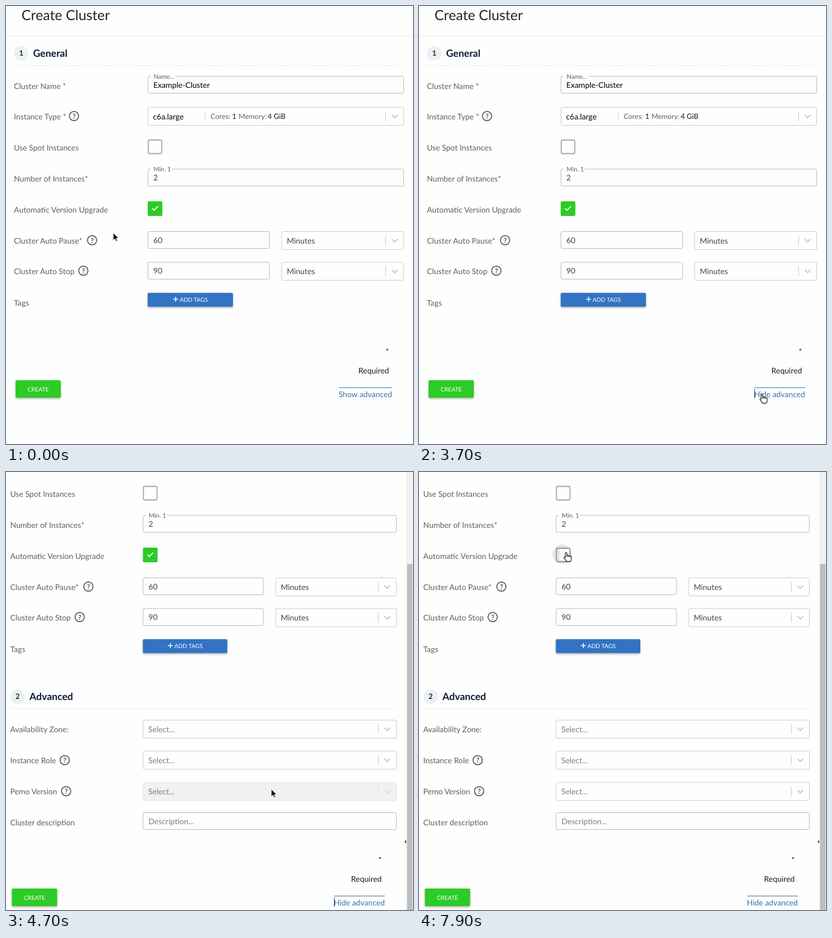
These frames come from a looping animation (721 px wide and 776 px high, 8000 ms). An HTML page:

```html
<!DOCTYPE html>
<html lang="en">
<head>
<meta charset="utf-8">
<title>Create Cluster</title>
<style>
  html, body { margin: 0; width: 100%; height: 100%; overflow: hidden; background: #fefefe; }
  svg { display: block; width: 721px; height: 776px; font: 13.85px Lato, sans-serif; text-rendering: geometricPrecision; }
  text { white-space: pre; fill: #1c1c1c; }
  .label { fill: #606060; }
  .title { font-size: 24.8px; fill: #212529; }
  .head { font-size: 17.5px; font-weight: 700; fill: #0d1a35; }
  .num { font-size: 13px; font-weight: 700; fill: #1c2937; text-anchor: middle; }
  .legend { font-size: 11px; fill: #606060; }
  .black { fill: #000; }
  .value { fill: #444; }
  .hint { fill: #7c7c7c; }
  .small { font-size: 13px; }
  .spec { font-size: 12.5px; fill: #606060; }
  .caps { font-size: 10.3px; fill: #fff; }
  .link { fill: #3873b0; }
  .mid { text-anchor: middle; }
  .end { text-anchor: end; }
  .input { fill: #fefefe; stroke: #b9b9b9; }
  .select { fill: #fefefe; stroke: #cacaca; }
  .off { fill: #f1f1f1; stroke: #e5e5e5; }
  .btn { filter: drop-shadow(0 2px 1.5px rgba(0, 0, 0, .2)) drop-shadow(0 1px 2px rgba(0, 0, 0, .14)); }
</style>
</head>
<body>
<svg id="stage" viewBox="0 0 721 776"></svg>
<script>
const LOOP = 8000, STEP = 100;
const OPENED = 3700, EXPANDED = 3800, UNCHECKED = 7100, BLINK = 482;
const ADVANCED_SHIFT = 287;

const text = (x, y, s, cls = '') => `<text x="${x}" y="${y}" class="${cls}">${s}</text>`;
const rect = (x, y, w, h, cls, fill = '') =>
  `<rect x="${x}" y="${y}" width="${w}" height="${h}" rx="2" class="${cls}" ${fill && `fill="${fill}"`}/>`;
const path = (d, stroke, width = 1, extra = '') =>
  `<path d="${d}" fill="none" stroke="${stroke}" stroke-width="${width}" ${extra}/>`;

const help = (x, y) =>
  `<circle cx="${x}" cy="${y}" r="8.2" fill="none" stroke="#555" stroke-width="1.7"/>` +
  `<text x="${x}" y="${y + 4.5}" class="mid" style="font-size:12.5px;font-weight:700;fill:#555">?</text>`;

const input = (x, y, w, s, cls) =>
  rect(x, y, w, 30, 'input') + text(x + 9.5, y + 20, s, cls);

const legend = (x, y, w, s) =>
  `<rect x="${x + 5}" y="${y - 2}" width="${w}" height="4" fill="#fefefe"/>` +
  text(x + 10, y + 4, s, 'legend');

function select(x, y, w, s, cls = 'value', box = 'select') {
  const r = x + w, c = y + 16, tone = box === 'off' ? '#dcdcdc' : '#c8c8c8';
  return rect(x, y, w, 32, box) + text(x + 9, y + 21, s, cls) +
    path(`M${r - 32} ${y + 7.5}v17`, tone) +
    path(`M${r - 21} ${c - 2.5}l5 5l5 -5`, tone, 2);
}

const section = (L, R, y, n, s) =>
  `<circle cx="${L + 13}" cy="${y}" r="13" fill="#edf1f2"/>` +
  text(L + 13, y + 4.2, n, 'num') + text(L + 34, y + 6.2, s, 'head') +
  path(`M${L} ${y + 21.5}H${R}`, '#e2e2e2', 1, 'stroke-dasharray="5 3"');

const emptyBox = (x, y) =>
  `<rect x="${x + 1}" y="${y + 1}" width="24" height="24" rx="2.5" fill="#fefefe" stroke="#a6a6a6" stroke-width="1.8"/>`;

function general(L, F, R) {
  const W = R - F, half = (W - 21) / 2, tagW = W / 3, tagMid = F + tagW / 2;
  const rows = [['Cluster Name *', 147], ['Instance Type *', 201], ['Use Spot Instances', 256],
    ['Number of Instances*', 310.7], ['Automatic Version Upgrade', 365.6], ['Cluster Auto Pause*', 420.5],
    ['Cluster Auto Stop', 475], ['Tags', 530.5]];
  const timer = (y, s) => input(F, y, half - .75, s, 'value') + select(R - half, y, half, 'Minutes');
  return text(L + 13.5, 24.8, 'Create Cluster', 'title') +
    path('M0 52.5H721', '#e8e8e8') +
    section(L, R, 84, 1, 'General') +
    rows.map(([s, y]) => text(L, y, s, 'label')).join('') +
    help(L + 106.5, 195) + help(L + 138.5, 415) + help(L + 123, 469) +
    input(F, 124.5, W, 'Example-Cluster', 'black') + legend(F, 124.5, 44, 'Name...') +
    select(F, 179.5, W, 'c6a.large', 'black') +
    path(`M${F + 101.5} 189v13`, '#ccc') +
    text(F + 111, 200, 'Cores:', 'spec') + text(F + 149, 200, '1', 'small') +
    text(F + 160.5, 200, 'Memory:', 'spec') + text(F + 212, 200, '4 GiB', 'small') +
    emptyBox(F - .5, 236.5) +
    input(F, 289, W, '2', 'value') + legend(F, 289, 37, 'Min. 1') +
    `<g class="upgrade">${rect(F - .5, 346, 26, 26, '', '#2dcb25')}` +
    path(`M${F + 7.5} 358.5l3.3 3.3l7 -7`, '#fff', 1.8) + '</g>' +
    timer(399.5, '60') + timer(454, '90') +
    rect(F - .5, 508.3, tagW, 24.5, 'btn', '#3273c4') +
    path(`M${tagMid - 31} 519.5h9m-4.5 -4.5v9`, '#fff', 1.5) +
    text(tagMid - 19.5, 524, 'ADD TAGS', 'caps');
}

function advanced(L, F, R) {
  const W = R - F;
  const rows = [['Availability Zone:', 673], ['Instance Role', 728], ['Pemo Version', 783.2],
    ['Cluster description', 838]];
  return section(L, R, 610, 2, 'Advanced') +
    rows.map(([s, y]) => text(L, y, s, 'label')).join('') +
    help(L + 96.5, 722.5) + help(L + 99, 777.5) +
    select(F, 651.5, W, 'Select...', 'hint') + select(F, 706.5, W, 'Select...', 'hint') +
    `<g id="locked">${select(F, 762, W, 'Select...', 'hint', 'off')}</g>` +
    `<g id="unlocked">${select(F, 762, W, 'Select...', 'hint')}</g>` +
    input(F, 815.5, W, 'Description...', 'hint') +
    '<path d="M706 867l3 -3v6z" fill="#444"/>';
}

function footer(L, R) {
  const e = R - 20.5;
  const link = (s, w, cls) => `<g class="${cls}">` +
    path(`M${e - w} 676.2H${e}`, '#2f6496') + text(e, 692.5, s, 'link end') + '</g>';
  return text(R - 26, 617, '*', 'end') + text(R - 26, 651, 'Required', 'end') +
    rect(L + 3, 663, 80, 31, 'btn', '#2dcb25') +
    text(L + 43, 682.5, 'CREATE', 'caps mid') +
    link('Show advanced', 94, 'show') + link('Hide advanced', 89.5, 'hide') +
    path(`M${e - 89.5} 678.5v17`, '#3b4a66', 1, 'class="caret"');
}

const ARROW = '<path d="M0 0V13.2L3.1 10.4L5.1 15L7.3 14L5.3 9.6L9.4 9.4Z" fill="#151515" stroke="#fff" stroke-width=".8"/>';
const HAND = '<path d="M-1.8 8.5V1.2Q-1.8 -.3 -.4 -.3Q1 -.3 1 1.2V5.2Q2.6 4 3.6 5.5Q5.2 4.6 6.2 6.2Q8.8 5.6 8.8 8V11Q8.8 13 7.6 14.8V15.6H.2V14.6L-3.8 9.7Q-4.6 8.2 -3.3 7.7Q-2.4 7.6 -1.8 8.5Z" fill="#fff" stroke="#1a1a1a" stroke-width="1.2" stroke-linejoin="round"/><path d="M1 5.2V8M3.6 5.7V8M6.2 6.4V8.3" fill="none" stroke="#1a1a1a"/>';

const wide = [14, 251.5, 704.5], narrow = [7.5, 243, 691.5];
document.getElementById('stage').innerHTML = `
  <g id="compact">${general(...wide)}${footer(wide[0], wide[2])}</g>
  <g id="full">
    <g id="page">${general(...narrow)}${advanced(...narrow)}
      <g transform="translate(0 ${ADVANCED_SHIFT})">${footer(narrow[0], narrow[2])}</g>
      <g id="cleared">${emptyBox(242.5, 346)}</g>
      <circle id="ripple" cx="253.5" cy="357.5" r="17" fill="#000" fill-opacity=".1"/>
      <rect id="inner" x="249" y="349" width="17" height="19" fill="#fff" fill-opacity=".8"/>
    </g>
    <rect x="709" width="12" height="776" fill="#f1f1f1"/>
    <rect id="thumb" x="710.5" width="9.5" height="613" fill="#bdbdbd"/>
  </g>
  <g id="arrow">${ARROW}</g><g id="hand">${HAND}</g>`;

// Pointer path: time, x, y
const moves = [
  [200, 190, 402], [300, 216, 402], [400, 252, 399], [500, 252, 399], [700, 254, 368],
  [900, 277, 349], [1000, 281, 350], [1400, 268, 361], [1500, 268, 361], [1700, 278, 347],
  [1900, 255, 352], [2000, 255, 352], [2400, 266, 354], [2600, 320, 425], [2900, 551, 655],
  [3200, 673, 687], [3500, 608, 688], [3800, 608, 688], [4100, 470, 562], [4800, 470, 562],
  [5000, 420, 566], [5300, 308, 578], [5600, 382, 570], [5700, 386, 568], [6200, 320, 563],
  [6300, 320, 563], [6500, 262, 55], [6600, 256, 86], [6700, 256, 86], [6800, 262, 143],
  [7000, 260, 143], [7200, 257, 144], [7800, 257, 144], [7900, 261, 143]
];
const scrolls = [[4200, 0], [4300, 28], [4400, 84], [4500, 212]];
const handTimes = [[700, 2500], [3100, 3800], [6800, LOOP]];

function at(keys, t) {
  const i = keys.findIndex(k => k[0] > t);
  if (i === 0) return keys[0].slice(1);
  if (i < 0) return keys[keys.length - 1].slice(1);
  const a = keys[i - 1], b = keys[i], p = (t - a[0]) / (b[0] - a[0]);
  return a.slice(1).map((v, j) => v + (b[j + 1] - v) * p);
}

const $ = id => document.getElementById(id);
const show = (el, on) => { el.style.display = on ? '' : 'none'; };
const showAll = (sel, on) => document.querySelectorAll(sel).forEach(el => show(el, on));

function render(t) {
  const full = t >= EXPANDED, open = t >= OPENED, cleared = t >= UNCHECKED;
  show($('compact'), !full);
  show($('full'), full);
  showAll('.show', !open);
  showAll('.hide', open);
  showAll('.caret', open && !cleared && Math.floor((t - OPENED) / BLINK) % 2 === 0);
  showAll('.upgrade', !cleared);
  show($('cleared'), cleared);
  show($('inner'), cleared);
  show($('locked'), !cleared);
  show($('unlocked'), cleared);
  $('ripple').setAttribute('r', 17 * Math.min(1, Math.max(0, (t - 6900) / 500)));

  const [scroll] = at(scrolls, t);
  $('page').setAttribute('transform', `translate(0 ${-scroll})`);
  $('thumb').setAttribute('y', .7 + scroll * .766);

  const [x, y] = at(moves, t), hand = handTimes.some(([a, b]) => t >= a && t < b);
  show($('arrow'), !hand);
  show($('hand'), hand);
  $(hand ? 'hand' : 'arrow').setAttribute('transform', `translate(${x} ${y})`);
}

const start = performance.now();
let last = -1;
function tick() {
  const t = Math.floor((performance.now() - start) % LOOP / STEP) * STEP;
  if (t !== last) render(last = t);
  requestAnimationFrame(tick);
}
tick();
</script>
</body>
</html>
```
